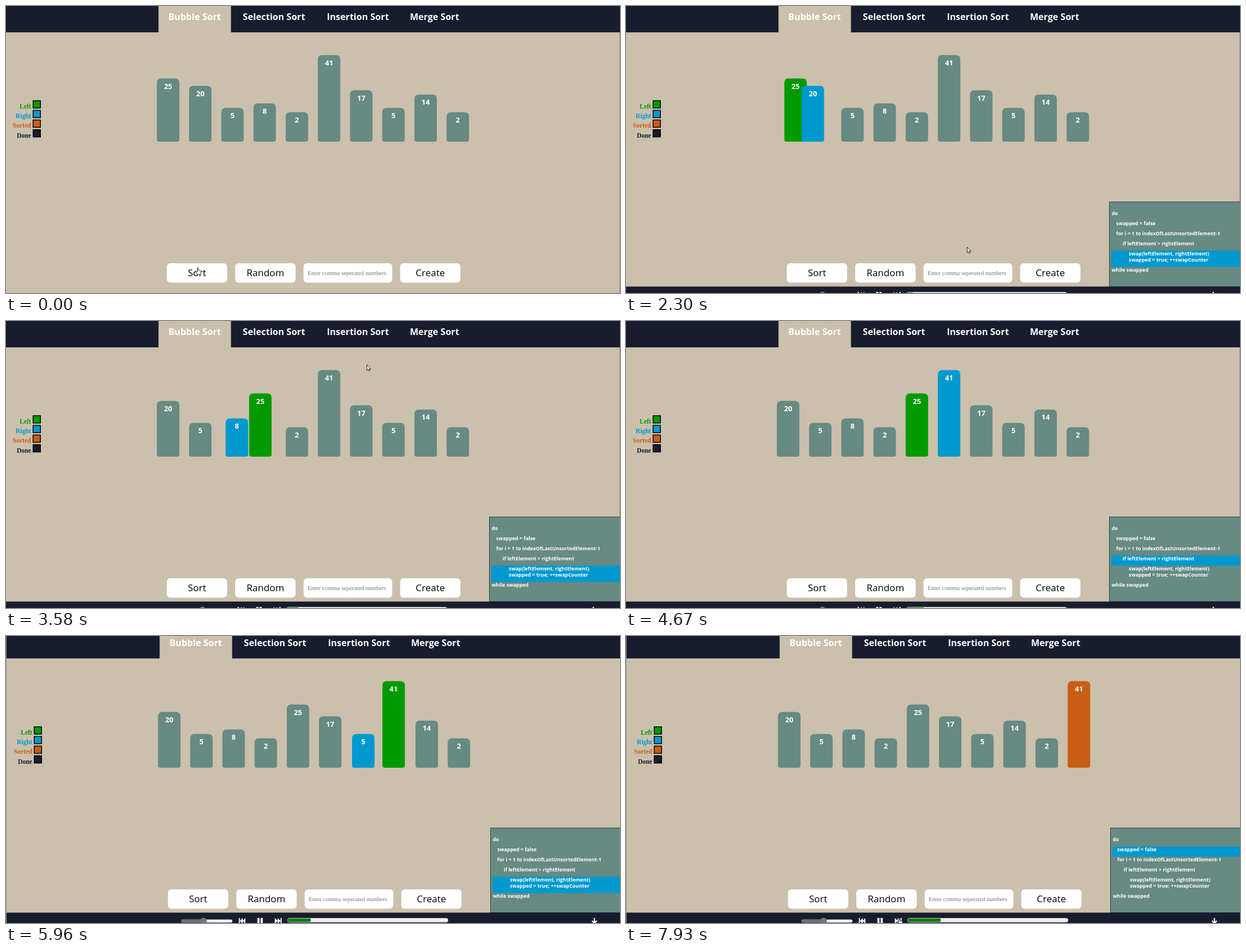
Write an HTML page that moves like this. It is 1093 px wide and 512 px high and loops after 8 s.

```html
<!DOCTYPE html>
<html lang="en">
<head>
<meta charset="utf-8">
<title>Bubble sort</title>
<style>
  html, body { margin: 0; width: 100%; height: 100%; overflow: hidden; background: #cbc0ac; }
  svg { display: block; width: 100vw; height: 100vh; }
  text { font-family: "Open Sans", "Noto Sans", sans-serif; fill: #fff; white-space: pre; }
  .nav text { font-size: 16.1px; font-weight: 700; text-anchor: middle; }
  .bars text { font-size: 13px; font-weight: 700; text-anchor: middle; }
  .code text { font-size: 8.85px; font-weight: 700; }
  .buttons text { font-size: 17px; fill: #000; text-anchor: middle; }
  .buttons .hint { font: 10.7px "Liberation Serif", serif; fill: #757575; text-anchor: start; }
  .legend text { font: 700 11.5px "Liberation Serif", serif; text-anchor: end; }
</style>
</head>
<body>
<svg id="stage" viewBox="0 0 1093 512" preserveAspectRatio="none"></svg>
<script>
const NS = "http://www.w3.org/2000/svg";
const LOOP = 8000, SWAP_MS = 420, PITCH = 57.3;
const SAND = "#cbc0ac", NAVY = "#171c2f", TEAL = "#678a83",
      GREEN = "#009a00", BLUE = "#0099cf", ORANGE = "#c95e14";

const stage = document.getElementById("stage");

function add(parent, tag, attrs = {}, label) {
  const el = document.createElementNS(NS, tag);
  for (const key in attrs) el.setAttribute(key, attrs[key]);
  if (label !== undefined) el.textContent = label;
  parent.appendChild(el);
  return el;
}
const group = (parent, name) => add(parent, "g", name ? { class: name } : {});
const rect = (parent, x, y, width, height, fill, more) =>
  add(parent, "rect", { x, y, width, height, fill, ...more });
const text = (parent, x, y, label, more) => add(parent, "text", { x, y, ...more }, label);
const path = (parent, d, more) => add(parent, "path", { d, ...more });
const place = (el, x, y) => el.setAttribute("transform", `translate(${x} ${y})`);
const clamp = v => Math.min(1, Math.max(0, v));

// cubic-bezier(.25, .1, .25, 1)
function ease(x) {
  if (x <= 0) return 0;
  if (x >= 1) return 1;
  const curve = (a, b, u) => 3 * a * u * (1 - u) ** 2 + 3 * b * u * u * (1 - u) + u ** 3;
  let lo = 0, hi = 1;
  for (let i = 0; i < 24; i++) {
    const mid = (lo + hi) / 2;
    if (curve(.25, .25, mid) < x) lo = mid; else hi = mid;
  }
  return curve(.1, 1, lo);
}

// Page
const page = group(stage);
rect(page, -10, -10, 1120, 560, SAND);

const nav = group(page, "nav");
rect(nav, -1, -10, 1110, 57, NAVY);
rect(nav, 271.5, -10, 129, 57, SAND);
[["Bubble Sort", 335.8], ["Selection Sort", 477], ["Insertion Sort", 626.4], ["Merge Sort", 762.8]]
  .forEach(([label, x]) => text(nav, x, 25, label));

const legend = group(page, "legend");
[["Left", GREEN], ["Right", BLUE], ["Sorted", ORANGE], ["Done", NAVY]].forEach(([label, color], i) => {
  const y = 17.2 * i;
  text(legend, 44.7, 183 + y, label, { style: `fill:${color}` });
  rect(legend, 48.3, 169 + y, 13, 13, color, { stroke: "#000", "stroke-width": 1.5 });
});

const buttons = group(page, "buttons");
const boxes = [[286.3, 107.3, "Sort"], [408, 107.5, "Random"], [529.7, 157.8], [701.6, 107.3, "Create"]];
boxes.forEach(([x, w, label]) => {
  rect(buttons, x, 459, w, 34.5, "#fff", { rx: 6 });
  if (label) text(buttons, x + w / 2, 482, label);
});
text(buttons, 537, 479.5, "Enter comma seperated numbers", { class: "hint" });

// Bars
const values = [25, 20, 5, 8, 2, 41, 17, 5, 14, 2];
const barLayer = group(page, "bars");
const bars = values.map(v => {
  const g = group(barLayer), h = 47.3 + 2.615 * v, top = 242 - h;
  const shape = path(g, `M0 ${top + 8}q0 -8 8 -8h24q8 0 8 8V238q0 4 -4 4H4q-4 0 -4 -4z`);
  text(g, 20, top + 18.3, v);
  return { v, g, shape };
});

rect(page, -2, -10, 1, 560, "#96928a");
rect(page, 1092.2, 47, 1, 500, "#8a867d");

// Code panel and player
const drawer = group(page);
const code = group(drawer, "code");
rect(code, 860.5, 349.5, 260, 151, TEAL, { stroke: "#33453f" });
const mark = rect(code, 864, 353, 256, 18, BLUE);
[["do", 864.5, 373], ["swapped = false", 872.5, 391],
 ["for i = 1 to indexOfLastUnsortedElement-1", 872.5, 409],
 ["if leftElement > rightElement", 884, 427],
 ["swap(leftElement, rightElement)", 895, 445],
 ["swapped = true; ++swapCounter", 895, 456], ["while swapped", 864.5, 474]]
  .forEach(([line, x, y]) => text(code, x, y, line));
const rows = [[353, 29.7], [382.7, 17.8], [400.5, 18], [418.5, 18], [436.3, 29.2], [465.5, 18]];

rect(drawer, -1, 500.5, 1110, 60, NAVY);
rect(drawer, 310, 512.7, 91, 5.5, "#efefef", { rx: 2.7 });
rect(drawer, 310, 512.7, 41, 5.5, "#6f6f6f", { rx: 2.7 });
add(drawer, "circle", { cx: 349.7, cy: 515.3, r: 5.7, fill: "#767676" });
const icons = { fill: "#fff" };
path(drawer, "M412.5 510h2v10.5h-2zM414.5 515.2l5 -5.2v10.5zM419.2 515.2l5 -5.2v10.5z", icons);
path(drawer, "M445.5 510h3.8v10.5h-3.8zM451.3 510h3.8v10.5h-3.8z", icons);
path(drawer, "M476.5 510l5.2 5.2 -5.2 5.3zM481.5 510l5.2 5.2 -5.2 5.3zM486.7 510h2v10.5h-2z", icons);
path(drawer, "M1045.5 510v9M1041.2 515l4.3 4.5 4.3 -4.5", { fill: "none", stroke: "#fff", "stroke-width": 2.2 });
rect(drawer, 498.8, 510.3, 286.4, 7.4, "#efefef", { rx: 3.7 });
const fill = rect(drawer, 499.3, 511, 0, 6, "#0a800a", { rx: 2.5 });

// Pointer
const outline = { fill: "#fff", stroke: "#111", "stroke-width": .9, "stroke-linejoin": "round" };
const arrow = path(stage, "M.5 .5V10.6L2.8 8.6 4.3 11.8 5.8 11.1 4.4 8H7.2z", outline);
const hand = path(stage, "M-.9 1Q0 -.3 .9 1V5L4.6 5.8Q6 6.2 5.8 8L5 11.2V13.2H-1.2V11.8L-4.2 8Q-4.4 6.4 -2.8 7L-.9 8.6z", outline);

// Timeline
const starts = [2229, 2850, 3341, 4020, 4670, 5140, 5632, 6280, 6800];
const sortedAt = 7370;
const lines = [[0, 0], [1730, 1], [1900, 2], [2080, 3], [2229, 4], [4670, 3], [5140, 4], [sortedAt, 5], [7930, 1]];
const steps = [[0, 0], [1730, 2], [1900, 3], [2080, 4],
  ...starts.map((s, i) => [s, 5 + 2 * i]), [sortedAt, 22], [7930, 24.3]];
const route = [[1730, 341.5, 466], [2000, 500, 440], [2300, 607, 429.5], [2480, 595, 430], [2850, 595, 430],
  [3560, 642, 77.5], [3660, 642, 77.5], [4020, 690, 30], [4420, 660, -10.5], [4690, 660, -10.5], [4740, 660, -30],
  [6250, 665, -30], [6500, 640, 150], [6740, 560, 400], [7370, 486.5, 503]];

const latest = (list, t) => list.filter(e => e[0] <= t).pop()[1];

function along(t) {
  if (t <= route[0][0]) return route[0].slice(1);
  for (let i = 1; i < route.length; i++) {
    const [t1, x1, y1] = route[i];
    if (t < t1) {
      const [t0, x0, y0] = route[i - 1], p = (t - t0) / (t1 - t0);
      return [x0 + (x1 - x0) * p, y0 + (y1 - y0) * p];
    }
  }
  return route[route.length - 1].slice(1);
}

function drawBars(t) {
  const order = bars.slice();
  const shown = bars.map(() => 0);
  const paint = (bar, slot, color) => {
    place(bar.g, 268.6 + PITCH * slot, 0);
    bar.shape.setAttribute("fill", color);
  };
  let pair = -1, moved = 0;
  for (let i = 0; i < starts.length; i++) {
    if (t < (i ? starts[i] : 2080)) break;
    pair = i;
    const swaps = order[i].v > order[i + 1].v;
    const done = t >= (starts[i + 1] || sortedAt);
    moved = swaps ? ease((t - starts[i]) / SWAP_MS) : 0;
    if (done && swaps) [order[i], order[i + 1]] = [order[i + 1], order[i]];
  }
  order.forEach((bar, i) => paint(bar, i, TEAL));
  if (t >= sortedAt) paint(order[9], 9, ORANGE);
  else if (pair >= 0) {
    paint(order[pair], pair + moved, GREEN);
    paint(order[pair + 1], pair + 1 - moved, BLUE);
    if (barLayer.lastChild !== order[pair + 1].g) barLayer.appendChild(order[pair + 1].g);
  }
}

function draw(t) {
  const nudge = clamp((t - 4690) / 230);
  place(page, Math.round(2 * nudge), -Math.round(7 * nudge));
  place(drawer, 0, 175 * (1 - ease((t - 575) / 565)));
  drawBars(t);

  const [y, h] = rows[latest(lines, t)];
  mark.setAttribute("y", y);
  mark.setAttribute("height", h);
  fill.setAttribute("width", latest(steps, t) * 2.43);

  const [cx, cy] = along(t);
  const onButton = cy >= 459 && cy <= 493 && boxes.some(([x, w]) => cx >= x && cx <= x + w);
  const pointing = onButton || t >= 7520;
  hand.setAttribute("visibility", pointing ? "visible" : "hidden");
  arrow.setAttribute("visibility", pointing ? "hidden" : "visible");
  place(pointing ? hand : arrow, cx, cy);
}

const began = performance.now();
function tick() {
  draw((performance.now() - began) % LOOP);
  requestAnimationFrame(tick);
}
tick();
</script>
</body>
</html>
```
